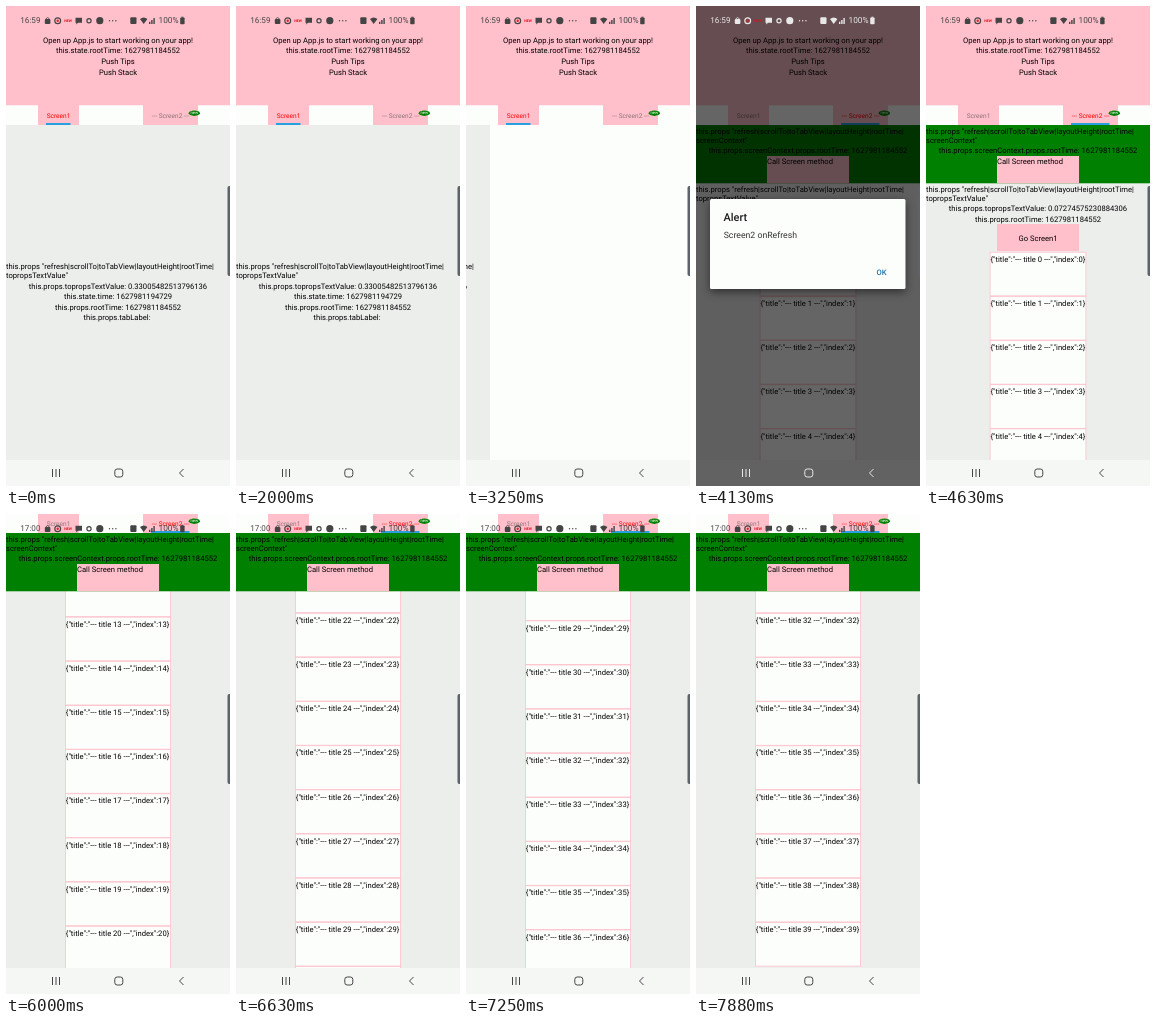
These frames come from a looping animation (224x480 px, 8 s). An HTML page:

```html
<!DOCTYPE html>
<html lang="en">
<head>
<meta charset="utf-8">
<title>Tab view demo</title>
<style>
html, body { margin: 0; width: 100%; height: 100%; overflow: hidden; background: #fcfefc; }
svg { display: block; width: 100%; height: 100%; }
text { font-family: Roboto, Arial, sans-serif; text-rendering: geometricPrecision; white-space: pre; }
.card { filter: drop-shadow(0 3px 4px rgba(0, 0, 0, 0.5)); }
</style>
</head>
<body>
<svg id="stage" viewBox="0 0 224 480"></svg>
<script>
const LOOP = 8000, STEP = 125;
const PINK = '#ffc0cb', GRAY = '#eceeec', WHITE = '#fcfefc', GREEN = '#008000';
const PITCH = 44.16, LIST_TOP = 246.2, ITEMS = 40, HEADER = 100;
const ROOT_TIME = '1627981184552';
const PROPS = 'this.props "refresh|scrollTo|toTabView|layoutHeight|rootTime|';

// [time, value] pairs
const SWIPE = [[2875, 0], [3000, 20], [3125, 110], [3250, 200], [3375, 224]];
const SCROLL = [[4625, 0], [5250, 187], [5450, 235], [5950, 677], [6500, 1118.5],
  [6750, 1118.5], [7250, 1420], [7800, 1560]];
const ALERT = [[3250, 0], [3500, 1], [4125, 1], [4375, 0]];

function track(keys, t) {
  if (t <= keys[0][0]) return keys[0][1];
  for (let i = 1; i < keys.length; i++) {
    const [t0, a] = keys[i - 1], [t1, b] = keys[i];
    if (t <= t1) return a + (b - a) * (t - t0) / (t1 - t0);
  }
  return keys[keys.length - 1][1];
}

const rect = (x, y, w, h, fill, extra = '') =>
  `<rect x="${x}" y="${y}" width="${w}" height="${h}" fill="${fill}" ${extra}/>`;
const circle = (x, y, r, fill, extra = '') =>
  `<circle cx="${x}" cy="${y}" r="${r}" fill="${fill}" ${extra}/>`;
const path = (d, extra) => `<path d="${d}" ${extra}/>`;
const group = (x, y, body) => `<g transform="translate(${x} ${y})">${body}</g>`;

// y is the middle of the line
function label(s, x, y, { size = 7.63, fill = '#000', anchor = 'start', weight = 400 } = {}) {
  return `<text x="${x}" y="${y + size * 0.35}" font-size="${size}" fill="${fill}" ` +
    `text-anchor="${anchor}" font-weight="${weight}">${s}</text>`;
}
const centered = (s, y, x = 112) => label(s, x, y, { anchor: 'middle' });

function tab(x, w, name, active) {
  return rect(x, 99, w, 20, PINK) +
    label(name, x + w / 2, 109.3, { size: 6.54, anchor: 'middle', fill: active ? '#f00' : '#8d7478' }) +
    (active ? rect(x + 8, 117, w - 16.5, 2, '#2a9fe0') : '');
}

function header(second) {
  return rect(0, 0, 224, 99.5, PINK) + rect(0, 99.5, 224, 19.5, WHITE) +
    centered('Open up App.js to start working on your app!', 34) +
    centered('this.state.rootTime: ' + ROOT_TIME, 44.7) +
    centered('Push Tips', 55.4) + centered('Push Stack', 66) +
    tab(32, 41, 'Screen1', !second) + tab(137, 55, '--- Screen2 ---', second) +
    '<ellipse cx="188.3" cy="107.2" rx="5.6" ry="2.7" fill="#008000"/>' +
    label('new', 188.3, 106.9, { size: 4.2, fill: '#fff', anchor: 'middle' });
}

function firstPage(t) {
  const time = t < 2625 ? '1627981194729' : '1627981197358';
  return rect(0, 119, 224, 335, GRAY) +
    label(PROPS, 0, 260.5) + label('topropsTextValue"', 0, 269.4) +
    centered('this.props.topropsTextValue: 0.33005482513796136', 280) +
    centered('this.state.time: ' + time, 290.6) +
    centered('this.props.rootTime: ' + ROOT_TIME, 301.2) +
    centered('this.props.tabLabel:', 311.8, 111);
}

function list(scroll) {
  const x = scroll > 20 ? 59.4 : 64.1, w = 224 - 2 * x;
  const first = Math.max(0, Math.floor((scroll - 190) / PITCH));
  let out = '';
  for (let i = first; i < Math.min(ITEMS, first + 12); i++) {
    const y = LIST_TOP + i * PITCH;
    out += rect(x, y, w, PITCH - 0.5, WHITE, `stroke="${PINK}" stroke-width="0.8"`) +
      label(`{"title":"--- title ${i} ---","index":${i}}`, x + 0.4, y + 7);
  }
  return out;
}

function secondPage(scroll) {
  return rect(0, 0, 224, 454, GRAY) + group(0, -scroll,
    label(PROPS, 0, 183.5) + label('topropsTextValue"', 0, 192) +
    centered('this.props.topropsTextValue: 0.07274575230884306', 202.3) +
    centered('this.props.rootTime: ' + ROOT_TIME, 213) +
    rect(71, 218, 82, 27, PINK) + centered('Go Screen1', 232) + list(scroll));
}

function stickyBar() {
  return rect(0, 119, 224, 58.3, GREEN) +
    label(PROPS, 0, 125.7) + label('screenContext"', 0, 134.6) +
    centered('this.props.screenContext.props.rootTime: ' + ROOT_TIME, 144.7) +
    rect(71, 150, 82, 27.3, PINK) + label('Call Screen method', 71, 155.6);
}

function statusBar(t, ink) {
  const fill = `fill="${ink}"`, ring = `stroke="${ink}" stroke-width="1.2"`;
  return label(t < 6000 ? '16:59' : '17:00', 14.3, 14.5, { size: 8.1, fill: ink }) +
    rect(38.8, 13, 5.6, 5, ink, 'rx="1"') +
    path('M40 13.2v-.6q1.6-2 3.2 0v.6', `fill="none" stroke="${ink}" stroke-width="0.8"`) +
    circle(51.7, 14.7, 2.9, 'none', ring) + circle(51.7, 14.7, 1.2, '#d22') +
    label('NEW', 62, 14.5, { size: 3.6, fill: '#e01020', anchor: 'middle', weight: 700 }) +
    path('M69.5 11.8h6.5v5h-4l-1.7 1.6v-1.6h-.8z', fill) +
    circle(83, 14.7, 2.1, 'none', ring) + circle(93.8, 14.7, 3.6, ink) +
    [103.5, 106.7, 109.9].map(x => circle(x, 14.7, 0.7, ink)).join('') +
    rect(124.3, 11.3, 6.2, 6.6, ink, 'rx="1"') +
    path('M134 13q3.7-3 7.4 0l-3.7 5z', fill) +
    path('M143 18h1.4v-2.2h-1.4zM145.2 18h1.4v-4h-1.4zM147.4 18h1.4v-6h-1.4z', fill) +
    label('100%', 152.5, 14.5, { size: 8.3, fill: ink }) +
    rect(174.2, 11.5, 4.4, 6.7, ink, 'rx="0.8"') + rect(175.4, 10.7, 2, 1, ink);
}

function navIcons(ink) {
  const line = `fill="none" stroke="${ink}" stroke-width="1"`;
  return path('M46.5 463v8M50 463v8M53.5 463v8', line) +
    `<rect x="108.8" y="463" width="8" height="8" rx="2.4" ${line}/>` +
    path('M177.5 463l-4 4 4 4', line);
}

function dialog() {
  return rect(14, 193, 195.5, 90, WHITE, 'rx="1.5" class="card"') +
    label('Alert', 27.5, 211.3, { size: 10.9, fill: '#1c1c1c', weight: 500 }) +
    label('Screen2 onRefresh', 27.7, 229, { size: 8.72, fill: '#333' }) +
    label('OK', 185.5, 266.7, { fill: '#1673b0', anchor: 'middle', weight: 500 });
}

function scene(t) {
  const shift = track(SWIPE, t), scroll = track(SCROLL, t), alert = track(ALERT, t);
  const second = shift >= 224;
  const lift = -Math.min(scroll, HEADER);
  // system icons turn light while the screen is dimmed
  const ink = alert > 0.5 ? '#e8e8e8' : '#444';
  const pages = second ? secondPage(scroll) : rect(0, 119, 224, 335, WHITE) + group(-shift, 0, firstPage(t));
  return rect(0, 0, 224, 480, WHITE) + pages +
    group(0, lift, header(second) + (second ? stickyBar() : '')) +
    rect(0, 454, 224, 26, '#f5f7f5') +
    rect(0, 0, 224, 480, '#000', `opacity="${0.6 * alert}"`) +
    statusBar(t, ink) + navIcons(ink) +
    path('M224 180h-.8q-1.7 0-1.7 2v86q0 2 1.7 2h.8z', 'fill="#5d636b"') +
    (alert ? `<g opacity="${alert}">${dialog()}</g>` : '');
}

const stage = document.getElementById('stage');
const start = performance.now();
let shown = -1;
function tick() {
  const elapsed = (performance.now() - start) % LOOP;
  const t = Math.floor((elapsed + 5) / STEP) * STEP % LOOP;
  if (t !== shown) {
    stage.innerHTML = scene(t);
    shown = t;
  }
  requestAnimationFrame(tick);
}
tick();
</script>
</body>
</html>
```
